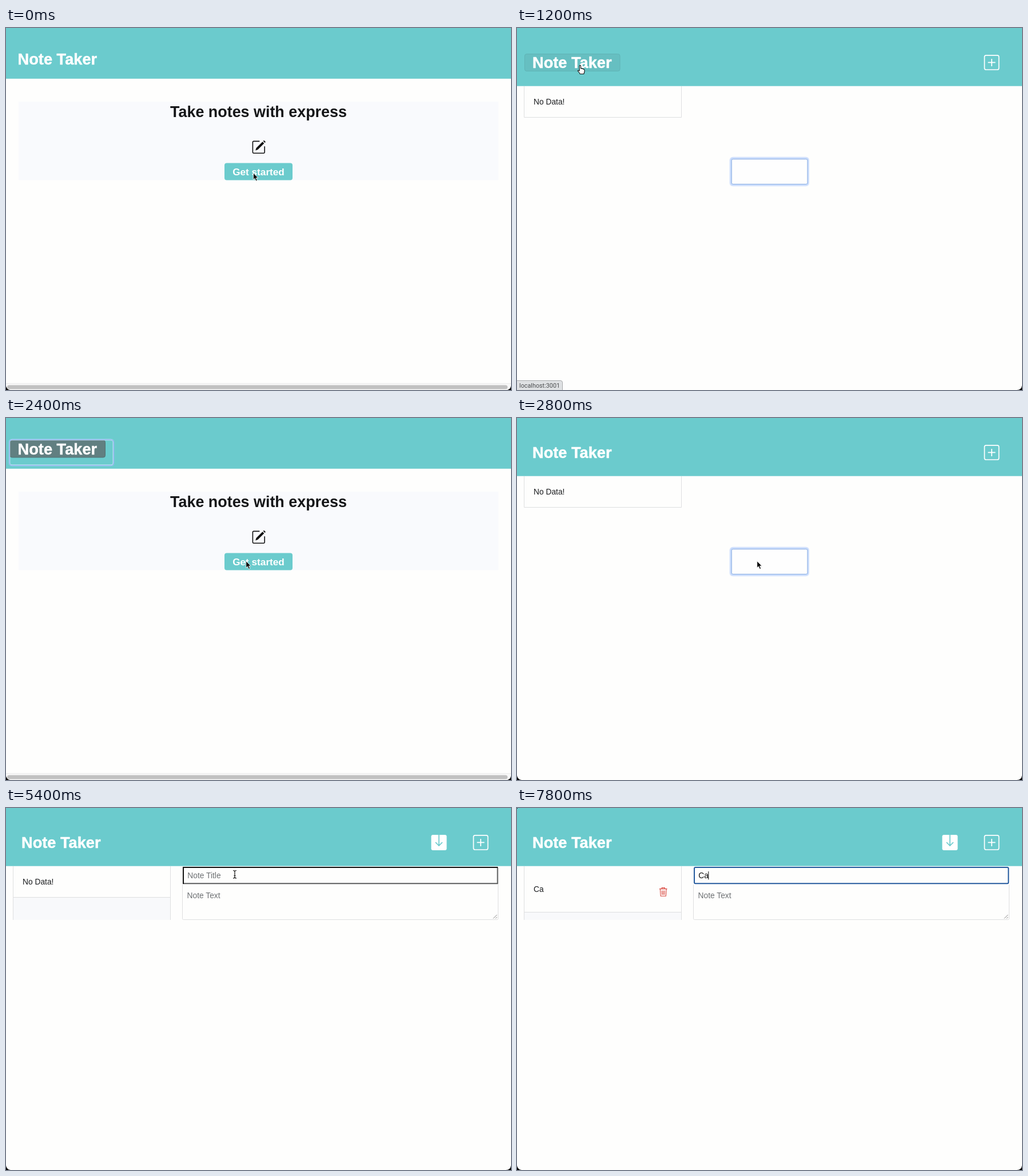
Write an HTML page that moves like this. It is 883 px wide and 634 px high and loops after 8000 ms.

```html
<!DOCTYPE html>
<html lang="en">
<head>
<meta charset="utf-8">
<title>Note Taker</title>
<style>
  html, body { margin: 0; width: 100%; height: 100%; overflow: hidden; background: #000; }
  svg { display: block; width: 100%; height: 100%; font: 13.8px "Liberation Sans", Arial, sans-serif; }
  .bold { font-weight: 700; }
  .title { font-size: 27.2px; fill: #fff; stroke: #fff; stroke-width: .5; }
  .line { fill: none; stroke: #dedfe0; }
  .hint { fill: #6d7073; }
</style>
</head>
<body>
<svg viewBox="0 0 883 634">
  <path fill="#fefefd" d="M0 0H883V626Q882 634 874 634H8Q1 633 0 626Z"/>
  <rect id="header" width="883" fill="#6bcbcd"/>

  <g id="home">
    <rect x="22" y="129" width="839" height="137.5" fill="#f9fafd"/>
    <text class="bold" x="441.5" y="156" font-size="26.9" text-anchor="middle" fill="#151618">Take notes with express</text>
    <g transform="translate(429 196) scale(1.6)">
      <path fill="none" stroke="#111" d="M9 1.5H2.5a1 1 0 0 0-1 1v11a1 1 0 0 0 1 1h11a1 1 0 0 0 1-1V7"/>
      <path fill="#111" d="M4.5 11.5L5.3 8.9L12.2 2L14 3.8L7.1 10.7ZM12.9 1.3L13.8.4L15.6 2.2L14.7 3.1Z"/>
    </g>
    <rect x="382" y="236.5" width="119" height="30" rx="4" fill="#6bcbcd"/>
    <text class="bold" x="441.5" y="258" font-size="17.2" text-anchor="middle" fill="#fff">Get started</text>
    <path fill="#f8f8f8" d="M0 622H883V626Q882 634 874 634H8Q1 633 0 626Z"/>
    <path stroke="#ebebeb" d="M0 622.5H883"/>
    <rect x="2" y="625.5" width="875" height="7" rx="3.5" fill="#c1c1c1"/>
  </g>

  <g id="notes">
    <rect id="sideFill" x="13" y="157" width="274" height="39" fill="#f8f9fb"/>
    <path id="side" class="line"/>
    <text id="item" x="29" fill="#1b1d1f"></text>
    <g id="trash" fill="none" stroke="#d9483f" stroke-width="1.1">
      <path d="M249 141.6H262.5M253.2 141V139.6H258.3V141M250.3 142L251.2 154.3H260.3L261.2 142M253.3 144.5L253.7 152M255.75 144.5V152M258.2 144.5L257.8 152"/>
    </g>
    <g fill="none" stroke="#fff" stroke-width="1.7">
      <rect x="817.4" y="47.8" width="25.2" height="25.2" rx="2.8"/>
      <path d="M830 54V67M823.5 60.4H836.5"/>
    </g>
    <g id="ghost">
      <rect x="371.3" y="225.4" width="140" height="52" rx="6" fill="#e3ecfd"/>
      <rect x="372.5" y="226.7" width="137.6" height="49.4" rx="5" fill="#c5d9fb"/>
      <rect x="375.3" y="229.8" width="132.6" height="43.6" rx="2.5" fill="#fefefe" stroke="#8eb0e2"/>
    </g>
    <g id="form">
      <rect x="743.5" y="47" width="27" height="27" rx="3" fill="#fff"/>
      <path fill="none" stroke="#6bcbcd" stroke-width="1.7" d="M757 47V66M751 60L757 66L763 60"/>
      <path class="line" d="M308.5 134V193.5Q308.5 195.5 310.5 195.5H858.5Q860.5 195.5 860.5 193.5V134"/>
      <path stroke="#777" stroke-width=".9" d="M852 193.5L858.5 187M856 193.5L858.5 191"/>
      <text class="hint" x="316.5" y="158">Note Text</text>
      <g id="inset" fill="none" stroke-width="2">
        <path stroke="#5b5c5d" d="M860 104V132H310" transform="translate(-.5 .2)"/>
        <path stroke="#111" d="M310 133V104H860"/>
      </g>
      <rect id="ring" x="310" y="104" width="549.3" height="28.2" rx="2" fill="none" stroke="#245a9e" stroke-width="2"/>
      <text id="field" x="317.3" y="123"></text>
      <path id="caret" stroke="#111" d="M0 111V125.5"/>
    </g>
  </g>

  <rect id="press" width="166.5" height="30" rx="3.5"/>
  <g id="focus" fill="none">
    <rect x="6" y="38" width="182" height="45" rx="4.5" stroke="#e2f0ff" stroke-width="2.4"/>
    <rect x="5.8" y="37.8" width="182.6" height="45.5" rx="4.8" stroke="#7aa9ea" stroke-width="1.3"/>
  </g>
  <text id="title" class="bold title">Note Taker</text>

  <g id="status">
    <path fill="#dfe1e3" stroke="#a9abad" d="M-1 617.5H76Q79.5 617.5 79.5 621V635H-1Z"/>
    <text x="4" y="630" font-size="10.8" fill="#4a4c4e" style="font-family:Roboto,sans-serif">localhost:3001</text>
  </g>
  <rect id="dot" width="1" height="1"/>

  <g id="cursor">
    <path id="arrow" transform="scale(.87)" fill="#000" stroke="#fff" stroke-width="1" d="M.5 0V13.5L3.6 10.7L5.9 16L8.4 15L6.1 9.8H10.2Z"/>
    <path id="hand" fill="#fff" stroke="#111" stroke-width="1.1" stroke-linejoin="round" d="M-1.8 8V1Q-1.8-.6-.6-.6T.6 1V5Q2.4 4 3 5.6Q4.8 4.7 5.2 6.4Q7 6 7 8V10.5Q6.6 12 5.8 14.5H-.8Q-2 11.5-4.6 9.4Q-4.8 7.2-1.8 9Z"/>
    <path id="beam" fill="none" stroke="#111" stroke-width="1.2" d="M-3-6.5Q0-6.5 0-4.5Q0-6.5 3-6.5M0-5V6M-3 7Q0 7 0 5Q0 7 3 7M-1.5 2.5H1.5"/>
  </g>
</svg>
<script>
const $ = Object.fromEntries([...document.querySelectorAll("[id]")].map(e => [e.id, e]));
const LOOP = 8000, STEP = 200;

// Pointer stops: time, x, y
const stops = [
  [0, 432, 254], [400, 432, 254], [1200, 111, 66], [1400, 111, 66],
  [1800, 122, 87], [2400, 419.3, 250.6], [2800, 419.3, 250.6],
  [3800, 832, 54], [4600, 832, 54], [5400, 400, 116], [LOOP, 400, 116]
];

const show = (el, on) => el.setAttribute("display", on ? "inline" : "none");
const set = (el, attrs) => { for (const k in attrs) el.setAttribute(k, attrs[k]); };
const ease = p => p * p * (3 - 2 * p);

function pointer(t) {
  const i = stops.findIndex(s => s[0] > t);
  const [t0, x0, y0] = stops[i - 1], [t1, x1, y1] = stops[i];
  const p = ease((t - t0) / (t1 - t0));
  return [x0 + (x1 - x0) * p, y0 + (y1 - y0) * p];
}

function render(ms) {
  const t = Math.floor(ms % LOOP / STEP) * STEP;
  const during = (a, b = LOOP) => t >= a && t < b;

  const home = during(0, 400) || during(1600, 2600);
  show($.home, home);
  show($.notes, !home);
  set($.header, { height: home ? 88.8 : 101.7 });
  set($.title, { x: home ? 20.6 : 27, y: home ? 63.8 : 70.3 });

  const hover = during(1200, 1600), focused = during(1600, 2600);
  show($.press, hover || focused);
  set($.press, home
    ? { x: 7, y: 39, fill: "#617f81", stroke: "#526f71" }
    : { x: 13.5, y: 45.5, fill: "#66bfc1", stroke: "#60b4b6" });
  show($.focus, focused);
  show($.status, during(1200, 2400));

  const form = t >= 4400, listed = t >= 6800, typing = t >= 6600;
  const base = listed ? 182.5 : 156.5;
  show($.ghost, t < 4200);
  show($.form, form);
  show($.sideFill, form);
  set($.sideFill, { y: base + .5, height: 195.5 - base });
  set($.side, { d: `M12.5 102V${form ? 196 : base}M287.5 102V${form ? 196 : base}M12.5 ${base}H287.5` });
  $.item.textContent = !listed ? "No Data!" : t < 7800 ? "C" : "Ca";
  set($.item, { y: listed ? 147 : 134 });
  show($.trash, listed);

  const active = t >= 5800;
  show($.inset, !active);
  show($.ring, active);
  const typed = t >= 7400 ? "Ca" : "C";
  $.field.textContent = typing ? typed : "Note Title";
  set($.field, { fill: typing ? "#111" : "#6d7073" });
  show($.caret, active);
  set($.caret, { transform: `translate(${!typing ? 317.5 : typed === "C" ? 327.5 : 334.8} 0)` });
  show($.dot, t >= 6200);

  const [x, y] = pointer(t);
  const beam = t >= 5200;
  show($.cursor, !typing);
  set($.cursor, { transform: `translate(${x} ${y})` });
  show($.hand, hover);
  show($.beam, beam);
  show($.arrow, !hover && !beam);
}

const start = performance.now();
function tick() {
  render(performance.now() - start);
  requestAnimationFrame(tick);
}
tick();
</script>
</body>
</html>
```
